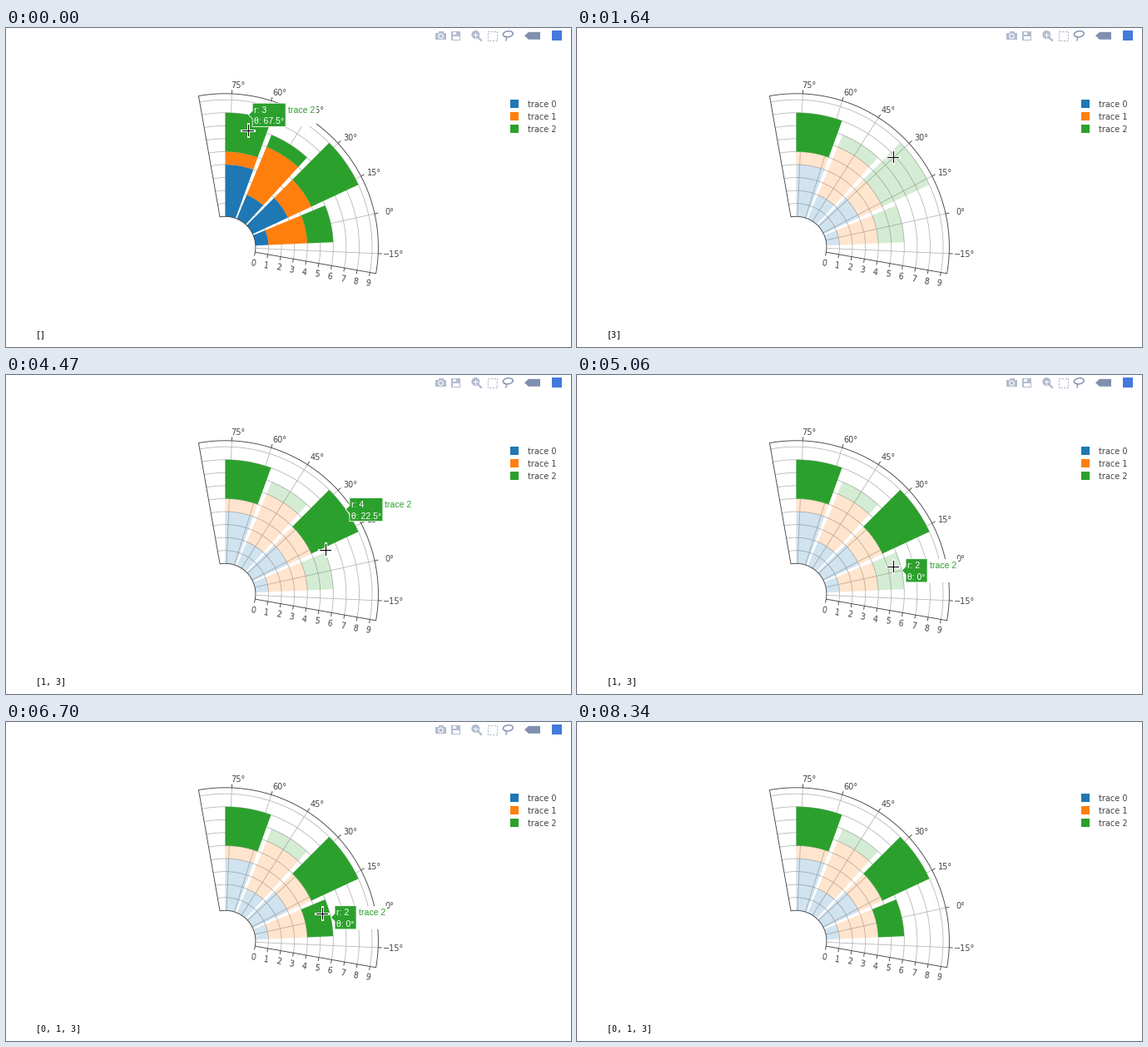
A matplotlib script for the animation above (9.54 s loop, 679 px wide and 383 px high).

```python
import numpy as np
import matplotlib.pyplot as plt
from matplotlib.animation import FuncAnimation
from matplotlib.collections import LineCollection
from matplotlib.patches import Circle, Ellipse, Polygon, Rectangle

W, H, DPI = 679, 383, 64
PT = 72 / DPI  # points per pixel
LOOP, STEP = 9540, 30

CX, CY = 263.4, 262.8
R_IN, R_OUT = 36.5, 184.0
UNIT = (R_OUT - R_IN) * 0.95 / 9
TURN = 12.5
SECTOR = (-10, 100)

COLORS = ["#1f77b4", "#ff7f0e", "#2ca02c"]
THETAS = [0, 22.5, 45, 67.5]
STACKS = [(1, 3, 2), (3, 2, 4), (2, 4, 1), (4, 1, 3)]
INK, GRID = "#444444", "#b4b4b4"

fig = plt.figure(figsize=(W / DPI, H / DPI), dpi=DPI, facecolor="white")
ax = fig.add_axes([0, 0, 1, 1])
ax.set_xlim(0, W)
ax.set_ylim(H, 0)
ax.axis("off")


def polar(r, deg):
    a = np.radians(deg)
    return CX + r * np.cos(a), CY - r * np.sin(a)


def radius(value):
    return R_IN + UNIT * value


def arc(r, a0, a1, n=80):
    return np.column_stack(polar(r, np.linspace(a0, a1, n)))


def ring_part(r0, r1, a0, a1):
    return np.vstack([arc(r0, a0, a1), arc(r1, a1, a0)])


def text(x, y, s, size, color=INK, font="DejaVu Sans", **kw):
    return ax.text(x, y, s, fontsize=size * PT, color=color, family=font,
                   va="baseline", **kw)


def strokes(segments, color, width, z):
    ax.add_collection(LineCollection(segments, colors=color,
                                     linewidths=width * PT, zorder=z))


# Polar grid, outline and ticks
spokes = np.arange(-15, 76, 15)
grid = [arc(radius(v), *SECTOR) for v in range(1, 10)]
grid += [[polar(R_IN, a + TURN), polar(R_OUT, a + TURN)] for a in spokes]
strokes(grid, GRID, 0.8, 1)

ax.add_patch(Polygon(ring_part(R_IN, R_OUT, *SECTOR), fill=False,
                     edgecolor=INK, lw=0.9 * PT, zorder=4))

ticks = [[polar(R_OUT, a + TURN), polar(R_OUT + 4.5, a + TURN)] for a in spokes]
down = np.array([-np.sin(np.radians(10)), np.cos(np.radians(10))])
for v in range(10):
    foot = np.array(polar(radius(v), SECTOR[0]))
    ticks.append([foot, foot + 4.5 * down])
    x, y = foot + 16.6 * down
    text(x, y, str(v), 9.6, ha="center", rotation=-10,
         rotation_mode="anchor", zorder=5)
strokes(ticks, INK, 0.9, 4)

label_spots = [(465.5, 271.5), (460.5, 220.5), (443, 173.5), (413.5, 131.5),
               (374.5, 98.5), (328.5, 77.5), (278.5, 68.5)]
for a, (x, y) in zip(spokes, label_spots):
    name = f"{a}°".replace("-", "\u2212")
    text(x, y + 3.5, name, 9.8, ha="center", zorder=5)

# Stacked bars
bars = []
for i, (theta, stack) in enumerate(zip(THETAS, STACKS)):
    base = 0
    for k, value in enumerate(stack):
        mid = theta + TURN
        shape = ring_part(radius(base), radius(base + value), mid - 10, mid + 10)
        bar = ax.add_patch(Polygon(shape, facecolor=COLORS[k], lw=0, zorder=2))
        bars.append((i, k, bar))
        base += value

# Legend
for k, color in enumerate(COLORS):
    y = 91 + 15 * k
    ax.add_patch(Rectangle((606.3, y - 4.8), 9.6, 9.6, color=color, lw=0))
    text(627, y + 3.8, f"trace {k}", 9.7, color="#2a3f5f" if False else INK)


# Toolbar
def toolbar():
    dim, lit = "#b2bccf", "#808faf"

    def fill(patch, color):
        patch.set(facecolor=color, edgecolor="none", zorder=6)
        ax.add_patch(patch)

    def line(xs, ys, color, width=1.2, **kw):
        ax.plot(xs, ys, color=color, lw=width * PT, zorder=6, **kw)

    # camera
    fill(Rectangle((516, 5.5), 13, 8.7), dim)
    fill(Rectangle((519.5, 3.8), 6, 2.5), dim)
    fill(Circle((522.5, 9.8), 3.3), "white")
    fill(Circle((522.5, 9.8), 2.1), dim)
    # disk
    fill(Rectangle((535, 4), 11, 11), dim)
    fill(Rectangle((537, 5), 6, 3.2), "white")
    fill(Rectangle((536.5, 10), 8, 4), "white")
    fill(Rectangle((541, 5), 1.5, 2.6), dim)
    # magnifier
    line([567, 571], [11, 14.8], dim, 2.4)
    fill(Circle((564.3, 8), 5), dim)
    line([561.8, 566.8], [8, 8], "white", 1)
    line([564.3, 564.3], [5.5, 10.5], "white", 1)
    # dashed box
    line([579, 590, 590, 579, 579], [4, 4, 15, 15, 4], dim, 1.3,
         linestyle=(0, (1.6, 1.2)))
    # lasso
    ax.add_patch(Ellipse((603.3, 7.3), 12, 7, angle=-8, fill=False,
                         edgecolor=lit, lw=1.4 * PT, zorder=6))
    line([599.5, 600.8, 601.8, 600.5], [10, 11, 13, 15], lit)
    # tag
    fill(Polygon([(623, 9.3), (628, 4.8), (642, 4.8), (642, 13.8),
                  (628, 13.8)]), lit)
    # badge
    fill(Rectangle((656, 3), 12, 12), "#447adb")


toolbar()
veil = ax.add_patch(Rectangle((510, 0), W - 510, 18, color="white", lw=0,
                              zorder=7))

# Hover label, pointer and read-out
tip_box = ax.add_patch(Polygon([(0, 0)] * 3, facecolor=COLORS[2],
                               edgecolor="white", lw=0.8 * PT, zorder=9))
name_box = ax.add_patch(Rectangle((0, 0), 37, 28, color="white", lw=0, zorder=8))
FONT = "Liberation Sans"
tip_r = text(0, 0, "", 10.5, "white", FONT, zorder=10)
tip_theta = text(0, 0, "", 10.5, "white", FONT, zorder=10)
tip_name = text(0, 0, "trace 2", 10.5, COLORS[2], FONT, zorder=10)
tip = [tip_box, name_box, tip_r, tip_theta, tip_name]

halo, = ax.plot([], [], color="white", lw=3 * PT, zorder=11)
cross, = ax.plot([], [], color="black", lw=1.1 * PT, zorder=12)
readout = text(36, 370.8, "", 10, "black", "DejaVu Sans Mono")

# Timelines: (start in ms, value)
POINTER = [(0, (290, 122)), (1340, (302, 125)), (1490, (345, 139)),
           (1640, (379, 154)), (1790, (385, 163)), (1930, (388, 169)),
           (2080, (390, 173)), (2230, (390, 174)), (4320, (388, 189)),
           (4470, (383, 209)), (4610, (381, 219)), (4760, (380, 225)),
           (4910, (379, 228)), (5060, (379, 229)), (7600, (416, 237)),
           (7750, (458, 266)), (7900, (506, 301)), (8050, (552, 337)),
           (8190, None)]
HOVER = [(0, 3), (1490, None), (1790, 1), (4610, 0), (7600, None)]
PICKED = [(0, None), (290, [3]), (3880, [1, 3]), (6550, [0, 1, 3])]
OUTPUT = [(0, []), (440, [3]), (4030, [1, 3]), (6700, [0, 1, 3])]
TOOLS = [(0, 1), (2980, 0.5), (3130, 0.08), (3880, 0.5), (4030, 1),
         (5810, 0.5), (5960, 0.03), (6550, 0.5), (6700, 1),
         (8190, 0.4), (8340, 0)]


def at(track, t):
    return [value for start, value in track if start <= t][-1]


def show_tip(i):
    for part in tip:
        part.set_visible(i is not None)
    if i is None:
        return
    x, y = polar(radius(sum(STACKS[i])), THETAS[i] + TURN)
    left, top, bottom = x + 4.8, y - 14, y + 14.2
    right = left + (26 if i == 0 else 40)
    tip_box.set_xy([(x, y), (left, y - 4.8), (left, top), (right, top),
                    (right, bottom), (left, bottom), (left, y + 4.8)])
    name_box.set_xy((right, top))
    tip_r.set_text(f"r: {STACKS[i][2]}")
    tip_theta.set_text(f"θ: {THETAS[i]:g}°")
    tip_r.set_position((left + 2, y - 2.2))
    tip_theta.set_position((left + 2, y + 11.2))
    tip_name.set_position((right + 2.6, y - 2.2))


def show_pointer(pos):
    for part, size in ((halo, 7.5), (cross, 6.5)):
        part.set_visible(pos is not None)
        if pos:
            x, y = pos[0] + 0.5, pos[1] + 0.5
            part.set_data([x - size, x + size, np.nan, x, x],
                          [y, y, np.nan, y - size, y + size])


def draw(n):
    t = n * STEP + 20
    picked = at(PICKED, t)
    for i, k, bar in bars:
        solid = picked is None or (k == 2 and i in picked)
        bar.set_alpha(1 if solid else 0.2)
    show_tip(at(HOVER, t))
    show_pointer(at(POINTER, t))
    readout.set_text(str(at(OUTPUT, t)))
    veil.set_alpha(1 - at(TOOLS, t))
    return []


anim = FuncAnimation(fig, draw, frames=LOOP // STEP, interval=STEP,
                     repeat=True, repeat_delay=0, blit=False)
plt.show()
```
